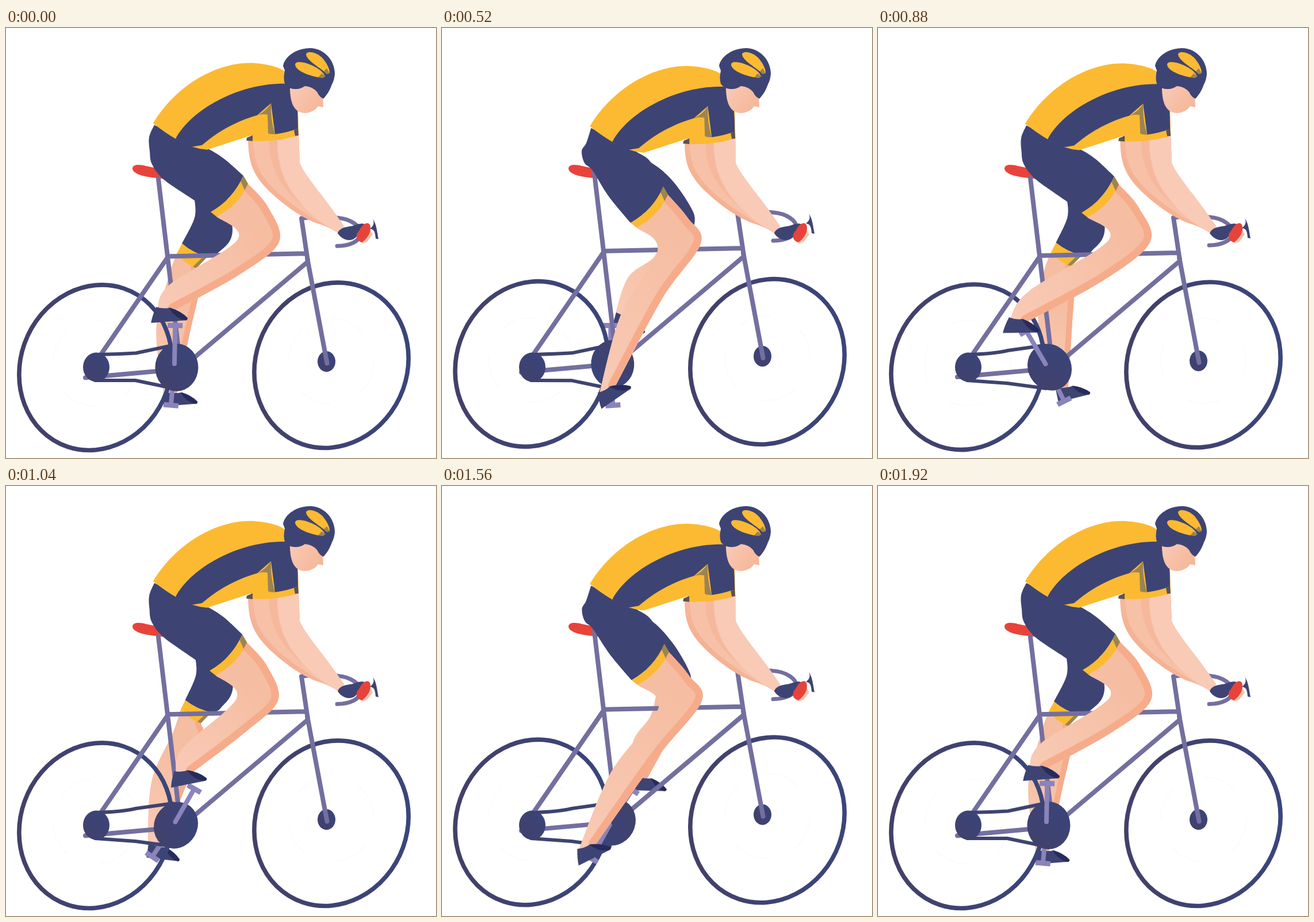
An HTML page with a canvas for the animation above (1960 ms loop, 748 px wide and 748 px high).

```html
<!DOCTYPE html>
<html lang="en">
<head>
<meta charset="utf-8">
<title>Cyclist</title>
<style>
html, body { margin: 0; width: 100%; height: 100%; overflow: hidden; background: #fff; }
canvas { display: block; width: 748px; height: 748px; }
</style>
</head>
<body>
<canvas id="stage" width="748" height="748"></canvas>
<script>
const ctx = document.getElementById('stage').getContext('2d');
const LOOP = 1960, TURN = 960, STEP = 40;
const { sin, cos, PI } = Math;
const RAD = PI / 180;
const AXLE = [293, 587], ARM = 70;
const NAVY = '#3d4474', DARK = '#272b5c', YELLOW = '#fcba32', KHAKI = '#9c8450';
const TUBE = '#736f9f', LILAC = '#8a84bb', RED = '#e8433b';
const SKIN = '#f7c1a8', LIGHT = '#f9cab6', SHADE = '#f6ac8b';

const mix = (a, b, k) => [a[0] + (b[0] - a[0]) * k, a[1] + (b[1] - a[1]) * k];

// Point at share k from a to b, pushed sideways by the given amount.
function beside(a, b, k, push) {
  const [x, y] = mix(a, b, k), dx = b[0] - a[0], dy = b[1] - a[1];
  const s = push / Math.hypot(dx, dy);
  return [x - dy * s, y + dx * s];
}

function through(pts, join) {
  if (join) ctx.lineTo(...pts[0]); else ctx.moveTo(...pts[0]);
  for (let i = 0; i < pts.length - 1; i++) {
    const a = pts[i], b = pts[i + 1], o = pts[i - 1] || a, e = pts[i + 2] || b;
    ctx.bezierCurveTo(a[0] + (b[0] - o[0]) / 6, a[1] + (b[1] - o[1]) / 6,
      b[0] - (e[0] - a[0]) / 6, b[1] - (e[1] - a[1]) / 6, b[0], b[1]);
  }
}

function bow(a, b, push) {
  ctx.quadraticCurveTo(...beside(a, b, .5, 2 * push), ...b);
}

function fill(d, color) {
  ctx.fillStyle = color;
  ctx.fill(new Path2D(d));
}

function line(d, color, width) {
  ctx.strokeStyle = color;
  ctx.lineWidth = width;
  ctx.stroke(new Path2D(d));
}

function ramp(x0, y0, x1, y1, from, to) {
  const g = ctx.createLinearGradient(x0, y0, x1, y1);
  g.addColorStop(0, from);
  g.addColorStop(1, to);
  return g;
}

function at(x, y, turn, draw) {
  ctx.save();
  ctx.translate(x, y);
  ctx.rotate(turn);
  draw();
  ctx.restore();
}

function disc(x, y, rx, ry) {
  ctx.beginPath();
  ctx.ellipse(x, y, rx, ry, 0, 0, 7);
  ctx.fillStyle = ramp(x - rx, y + ry, x + rx, y - ry, '#42406a', '#38457b');
  ctx.fill();
}

function wheel(x, y, rx, spin) {
  ctx.save();
  ctx.translate(x, y);
  ctx.transform(1, -.09, 0, 1, 0, 0);
  ctx.beginPath();
  ctx.ellipse(0, 0, rx, 143.3, 0, 0, 7);
  ctx.restore();
  ctx.strokeStyle = ramp(x - rx, y, x + rx, y, '#434069', '#3a457a');
  ctx.lineWidth = 7.6;
  ctx.stroke();
  at(x, y - 7, spin, () => {
    ctx.strokeStyle = '#f7f7f9';
    ctx.lineWidth = 1;
    for (let k = 0; k < 4; k++) {
      ctx.beginPath();
      ctx.arc(0, 0, 74, k * 1.57, k * 1.57 + .8);
      ctx.stroke();
    }
  });
}

function crank(turn) {
  at(...AXLE, turn, () => {
    line('M0 -3V-66', LILAC, 8);
    fill('M-13 -74H13V-65H-13Z', LILAC);
  });
}

// Place of a point given in the shoe's own axes, heel at the origin.
function onFoot({ x, y, tilt }, px, py) {
  return [x + px * cos(tilt) - py * sin(tilt), y + px * sin(tilt) + py * cos(tilt)];
}

function shoe({ x, y, tilt }, size, lean) {
  at(x, y, tilt, () => {
    ctx.scale(size, size);
    fill(`M0 0Q${lean * .3} -13 ${lean} -27Q23 -22 35 -24Q53 -17 64 -4Q64 0 60 0Z`, NAVY);
    fill('M33 -24Q53 -17 64 -4Q64 0 60 0Q42 -5 33 -24Z', DARK);
  });
}

// Skin from the cuff down: front edge to the ankle, back edge up again.
function limb(front, back, shadeWidth) {
  const top = front[0], end = back[0];
  ctx.save();
  ctx.beginPath();
  through(front);
  through(back, true);
  ctx.closePath();
  ctx.fillStyle = ramp(top[0], top[1] + 60, ...end, '#f5bda1', LIGHT);
  ctx.fill();
  ctx.clip();
  ctx.beginPath();
  through(front);
  ctx.strokeStyle = SHADE;
  ctx.lineWidth = shadeWidth;
  ctx.stroke();
  ctx.restore();
}

function cuff(back, front, outBack, outFront, push) {
  ctx.beginPath();
  ctx.moveTo(...back);
  bow(back, front, push);
  ctx.lineTo(...outFront);
  bow(outFront, outBack, -push);
  ctx.closePath();
  ctx.fillStyle = YELLOW;
  ctx.fill();
  ctx.beginPath();
  [front, outFront, beside(outBack, outFront, .85, push * .5), beside(back, front, .88, push * .4)]
    .forEach(p => ctx.lineTo(...p));
  ctx.fillStyle = KHAKI;
  ctx.fill();
}

// Each thigh point is its place with the leg down plus a shift as the leg lifts.
const lifter = turn => {
  const lift = (1 + cos(turn)) / 2;
  return (x, y, dx, dy) => [x + dx * lift, y + dy * lift];
};

function farLeg(turn) {
  const p = lifter(turn), c = cos(turn), s = sin(turn);
  const foot = { x: 289 + 7 * c + ARM * s, y: 588 - ARM * c, tilt: (4 + 10 * c - 20 * s) * RAD };
  const hemB = p(306, 375, 69, -30), hemF = p(350, 398, 88, -50);
  const outB = p(297, 392, 83, -38), outF = p(331, 418, 94, -66);
  const knee = p(337, 450, 93, -65), bend = p(283, 432, 87, -35);
  const front = onFoot(foot, 22, -18), back = onFoot(foot, 0, -18);
  limb([outF, knee, mix(knee, front, .4), front],
    [back, beside(back, bend, .55, -18), bend, outB], 20);
  ctx.beginPath();
  through([[330, 225], [365, 235], p(394, 350, 9, -82), p(368, 392, 69, -72), hemF]);
  bow(hemF, hemB, -3);
  through([hemB, p(328, 330, 27, -5), p(328, 298, 17, 0)], true);
  ctx.fillStyle = NAVY;
  ctx.fill();
  cuff(hemB, hemF, outB, outF, 3);
  shoe(foot, .9, 1);
  crank(turn);
}

function nearLeg(turn, dx, dy) {
  const p = lifter(turn), c = cos(turn), s = sin(turn);
  const thigh = (x, y) => p(x, y, 28, -19);
  const foot = {
    x: 262 - 11 * c + ARM * s,
    y: 597 - 5 * c - 5 * s - 9 * cos(2 * turn) - ARM * c,
    tilt: (-19 + 15 * c - 11 * s) * RAD
  };
  const hemB = thigh(328, 339), hemF = thigh(385, 276);
  const outB = thigh(338, 347), outF = thigh(393, 290);
  const knee = p(450, 375, 25, -3), bend = thigh(375, 387);
  const front = onFoot(foot, 43, -19), back = onFoot(foot, 13, -25);
  limb([outF, thigh(428, 331), knee, beside(knee, front, .4, 6 * s - 9 * c - 1), front],
    [back, beside(back, bend, .38 - .15 * c, -17), bend, outB], 26);
  shoe(foot, 1, 11);
  ctx.beginPath();
  through([[258 + dx, 169 + dy], p(251, 200, -2, -10), p(243, 214, 7, 0), p(248, 235, 6, 2),
    p(262, 248, 13, 16), p(290, 293, 38, 7), hemB]);
  bow(hemB, hemF, 7);
  through([hemF, p(362, 232, 18, -4), p(338, 215, 15, -4), [330 + dx, 203 + dy]], true);
  ctx.closePath();
  ctx.fillStyle = NAVY;
  ctx.fill();
  cuff(hemB, hemF, outB, outF, 7);
}

function bike(bob, turn) {
  const slack = (1 + cos(6 * turn)) / 2;
  wheel(155.8, 590.5 + bob * .67, 133, turn * 1.3);
  wheel(566, 586.5 + bob * .67, 134.2, turn * 1.3);
  fill('M220 244C221 237 232 237 243 240L283 248L284 264L264 261C249 260 220 256 220 244Z', RED);
  at(0, bob, 0, () => {
    line('M265 262L281 397L299 550M281 399L160 575M138 608L293 594M281 397L522 392M523 408L298 598M514 331L525 405', TUBE, 8);
    line('M514 331C535 328 556 328 577 330C600 332 616 344 617 356C617 371 597 379 576 379', TUBE, 7);
    disc(557.5, 580, 15.5, 18);
    line('M524 400L558.5 583', TUBE, 8);
  });
  line(`M160 568Q200 567 226 ${561 + 4.5 * slack}L290 552M155 613L225 ${618 - 5 * slack}L292 627`, '#3e436f', 6);
  disc(157, 590, 23, 25.5);
  at(297, 587.5, turn, () => disc(0, 3, 37.5, 41.5));
}

function jersey(dx, dy) {
  at(dx, dy, 0, () => {
    fill('M256 166C293 104 361 61 425 61C457 62 483 70 492 82L500 100L508 140L509 187C480 195 455 199 418 196L427 187L350 212Q322 210 295 193Q276 182 256 166Z', YELLOW);
    fill('M295 193C323 141 404 98 480 97H501Q508 130 508 175Q490 182 468 185L461 131L437 152C396 164 367 182 341 204L323 207Q308 202 295 193Z', NAVY);
    fill('M437 152Q453 145 461 131Q460 160 468 185Q458 185 456 183L455 151Q447 149 437 152Z', KHAKI);
    fill('M418 196L419 191L429 187V197ZM501 178L508 174L509 187L503 188Z', '#5a5258');
  });
}

function arm(dx, dy) {
  const top = (x, y) => `${x + dx} ${y + dy}`;
  const outer = `C557 298 519 257 511 235L${top(509, 185)}Z`;
  fill(`M${top(421, 194)}C422 233 428 254 457 283C482 307 516 332 545 341Q564 347 580 358L588 345${outer}`,
    ramp(420, 280, 470, 230, '#f4ad8d', '#f6b99d'));
  fill(`M${top(430, 195)}C431 239 443 260 478 291Q520 326 580 356L588 345${outer}`, SKIN);
  fill(`M${top(457, 196)}C459 252 484 291 545 330Q515 305 500 290C479 263 471 230 ${top(472, 194)}Z`, '#f6b89c');
  fill(`M${top(472, 194)}C472 275 520 323 580 358L588 345${outer}`, LIGHT);
}

function hand(bob) {
  at(-bob * .1, 0, 0, () => {
    fill('M614 365L620 375L629 371L638 359L631 347Z', SKIN);
    fill('M577 357C582 344 598 347 610 342C618 339 628 339 622 347C612 354 612 369 597 369C588 369 581 363 577 357Z', NAVY);
    fill('M616 350C622 337 634 336 634 347C635 358 626 368 619 373C610 370 608 364 611 357Z', RED);
  });
  at(0, bob, 0, () =>
    fill('M638 331C645 343 645 352 648 367L643 366C642 353 640 350 633 349C640 344 641 338 638 331Z', NAVY));
}

function head() {
  fill('M494 94C493 125 498 148 521 148Q537 146 543 136L552 138L551 118L530 96Z',
    ramp(495, 105, 545, 140, '#f9c9b4', '#f5b799'));
  fill('M482 66C485 49 506 35 529 35C552 35 572 55 572 80Q571 91 567 98C563 109 558 117 552 123Q545 120 541 111Q533 102 520 101C509 109 492 108 485 97Q482 88 485 74Z', NAVY);
  fill('M522 46C523 39 541 41 552 54Q563 68 563 78L558 80C546 68 524 58 522 46Z', YELLOW);
  fill('M503 64C503 55 525 60 540 69Q552 76 555 84Q548 88 535 84C520 80 504 73 503 64Z', YELLOW);
  fill('M558 70L563 79L557 80L553 75ZM549 79L556 84L551 87L543 86Z', KHAKI);
}

function draw(t) {
  const beat = 2 * PI * (t % TURN) / TURN;
  const turn = beat + (10 * cos(beat) - 9) * RAD;
  const bob = -4.3 + 4.7 * cos(beat - 15 * RAD);
  const dx = -bob * .14, dy = -bob * .55;
  ctx.fillStyle = '#fff';
  ctx.fillRect(0, 0, 748, 748);
  ctx.lineCap = ctx.lineJoin = 'round';
  farLeg(turn + 184 * RAD);
  bike(bob, turn);
  crank(turn);
  nearLeg(turn, dx, dy);
  arm(dx, dy);
  hand(bob);
  jersey(dx, dy);
  head();
}

const start = performance.now();
function frame() {
  const t = (performance.now() - start) % LOOP;
  draw(Math.floor(t / STEP) * STEP);
  requestAnimationFrame(frame);
}
frame();
</script>
</body>
</html>
```
